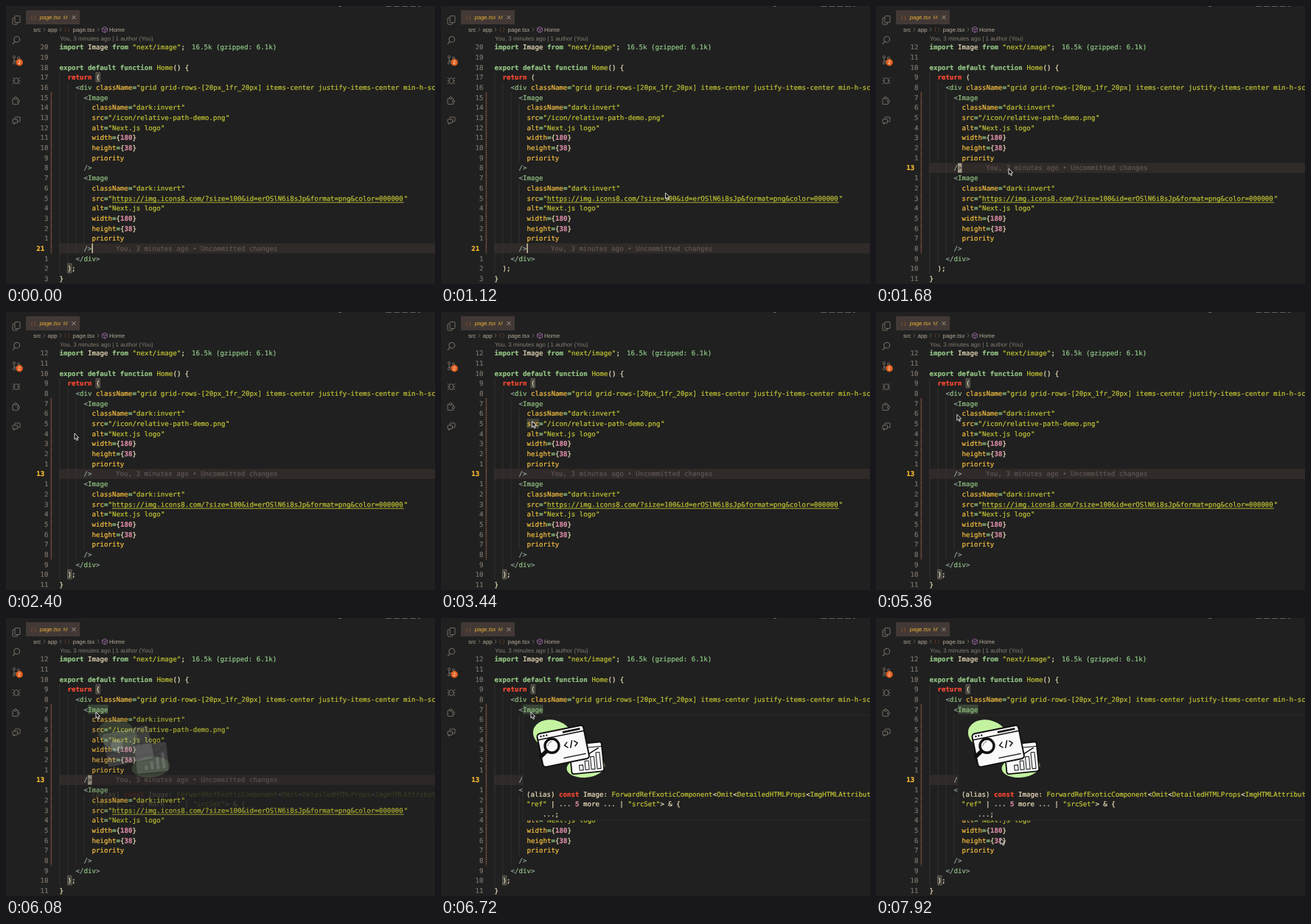
Write an HTML page with a canvas that moves like this. It is 582 px wide and 378 px high and loops after 8000 ms.

```html
<!DOCTYPE html>
<html lang="en">
<head>
<meta charset="utf-8">
<title>Editor hover preview</title>
<style>
html, body { margin: 0; width: 100%; height: 100%; overflow: hidden; background: #202020; }
canvas { display: block; width: 582px; height: 378px; }
</style>
</head>
<body>
<canvas id="stage"></canvas>
<script>
const W = 582, H = 378, LOOP = 8000;
const CW = 5.497, X0 = 72.5, ROW = 13.68, BASE = 59.3;
const CLICK = 1600, SRC_IN = 3280, SRC_OUT = 5300, IMAGE_IN = 5700, TRAVEL = 700;
const MONO = '"DejaVu Sans Mono", monospace';
const SANS = '"Liberation Sans", sans-serif';
const BG = '#202020', ICON = '#746c64', INK = '#111', PAPER = '#fafafa';

const canvas = document.getElementById('stage');
const dpr = window.devicePixelRatio || 1;
canvas.width = W * dpr;
canvas.height = H * dpr;
const c = canvas.getContext('2d');

// k keyword, f plain, s string, a attribute, t tag, p punctuation, n number, r return, u link
const COLORS = {
  k: '#92c484', f: '#ecdfba', s: '#bfc134', a: '#f2bc40', t: '#8fbf80',
  p: '#8fa396', n: '#d68aa0', r: '#fb4934', u: '#bfc134'
};
const BOLD = 'knr';

const attr = (name, value, kind = 's') => [8, 'a', name, 'k', '=', 's', '"', kind, value, 's', '"'];
const size = (name, value) => [8, 'a', name, 'k', '=', 'f', '{', 'n', value, 'f', '}'];
const imageTag = (src, kind) => [
  [6, 'p', '<', 't', 'Image'],
  attr('className', 'dark:invert'),
  attr('src', src, kind),
  attr('alt', 'Next.js logo'),
  size('width', '180'),
  size('height', '38'),
  [8, 'a', 'priority'],
  [6, 'p', '/>']
];
const LINES = [
  [0, 'k', 'import ', 'f', 'Image ', 'k', 'from ', 's', '"next/image"', 'f', ';'],
  [0],
  [0, 'k', 'export default function ', 's', 'Home', 'f', '() {'],
  [2, 'r', 'return ', 'f', '('],
  [4, 'p', '<', 't', 'div ', 'a', 'className', 'k', '=',
    's', '"grid grid-rows-[20px_1fr_20px] items-center justify-items-center min-h-screen'],
  ...imageTag('/icon/relative-path-demo.png'),
  ...imageTag('https://img.icons8.com/?size=100&id=erOSlN6i8sJp&format=png&color=000000', 'u'),
  [4, 'p', '</', 't', 'div', 'p', '>'],
  [2, 'f', ');'],
  [0, 'f', '}']
];

// arrival time and place of the pointer; each move fills the last TRAVEL ms at most
const STOPS = [
  [0, 560, -14], [1120, 304.5, 254], [CLICK, 180, 221], [2400, 93, 165],
  [3300, 123.5, 148.5], [4640, 96.5, 151.5], [IMAGE_IN, 122, 128], [7920, 169, 299.5]
];

const clamp = v => Math.max(0, Math.min(1, v));
const colX = col => X0 + col * CW;
const rowTop = row => 56 - ROW / 2 + row * ROW;

function text(str, x, y, color, font) {
  c.font = font;
  c.fillStyle = color;
  c.fillText(str, x, y);
}

// a hairline outline gives the heavier screen weight
function code(str, x, y, color, bold) {
  text(str, x, y, color, (bold ? 'bold ' : '') + '9.12px ' + MONO);
  c.strokeStyle = color;
  c.lineWidth = 0.22;
  c.strokeText(str, x, y);
}

function rect(x, y, w, h, color) {
  c.fillStyle = color;
  c.fillRect(x, y, w, h);
}

function paint(fill, stroke, width = 1) {
  if (fill) { c.fillStyle = fill; c.fill(); }
  if (stroke) { c.strokeStyle = stroke; c.lineWidth = width; c.stroke(); }
}

function line(points, color, width, fill) {
  c.beginPath();
  for (let i = 0; i < points.length; i += 2) c.lineTo(points[i], points[i + 1]);
  paint(fill, color, width);
}

function oval(x, y, rx, ry, fill, stroke, width) {
  c.beginPath();
  c.ellipse(x, y, rx, ry, 0, 0, Math.PI * 2);
  paint(fill, stroke, width);
}

function panel(x, y, w, h, r, fill, stroke, width) {
  c.beginPath();
  c.roundRect(x, y, w, h, r);
  paint(fill, stroke, width);
}

function at(x, y, angle, draw) {
  c.save();
  c.translate(x, y);
  c.rotate(angle);
  draw();
  c.restore();
}

function tokens(list, x, y) {
  for (let i = 0; i < list.length; i += 2) {
    const kind = list[i], str = list[i + 1], w = str.length * CW;
    code(str, x, y, COLORS[kind], BOLD.includes(kind));
    if (kind === 'u') rect(x, y + 2.1, w, 0.9, COLORS.u);
    x += w;
  }
}

function filesIcon() {
  panel(-5, -3, 6.5, 9, 1, null, ICON);
  panel(-2, -5.5, 7, 9, 1, BG, ICON);
}

function searchIcon() {
  oval(0.7, -1, 3.9, 3.9, null, ICON, 1.1);
  line([-2, 2, -5, 5.5], ICON, 1.2);
}

function branchIcon() {
  for (const [x, y] of [[-3, -4.5], [-3, 3.5], [3, -3]]) oval(x, y, 1.6, 1.6, null, ICON);
  line([-3, -3, -3, 2], ICON);
  line([3, -1.5, 1, 0.7, -3, 1], ICON);
  oval(4.2, 3, 4.7, 4.7, '#e2601f');
  text('2', 2.3, 5.4, '#fff', '6.5px ' + SANS);
}

function bugIcon() {
  oval(0, 0.5, 3, 4, null, ICON);
  for (const side of [-1, 1]) {
    for (const k of [-1, 0, 1]) line([side * 2.8, 0.5 + k * 2, side * 5.2, 0.5 + k * 4.5], ICON);
  }
}

function puzzleIcon() {
  panel(-5, -3, 7.5, 8, 0.5, null, ICON);
  oval(-1, -3.5, 1.6, 1.6, BG, ICON);
  oval(3, 1, 1.6, 1.6, BG, ICON);
}

function chatIcon() {
  panel(-2, -5, 7, 6, 0.5, null, ICON);
  panel(-5, -2, 6.5, 5, 0.5, BG, ICON);
  line([-3.5, 3, -3.5, 5, -1.5, 3], ICON);
}

function activityBar() {
  [filesIcon, searchIcon, branchIcon, bugIcon, puzzleIcon, chatIcon]
    .forEach((icon, i) => at(14, 19 + i * 27.4, 0, icon));
}

function cube() {
  const r = 3.9, color = '#a06aa8';
  c.beginPath();
  for (let i = 0; i < 6; i++) c.lineTo(r * Math.sin(i * Math.PI / 3), r * Math.cos(i * Math.PI / 3));
  c.closePath();
  paint(null, color, 0.9);
  for (let i = 0; i < 3; i++) {
    const a = i * Math.PI * 2 / 3;
    line([0, 0, r * Math.sin(a), r * Math.cos(a)], color, 0.8);
  }
}

function header() {
  rect(451, 0, 4, 0.8, '#777');
  c.setLineDash([8, 3]);
  line([515, 0.4, 562, 0.4], '#777', 0.8);
  c.setLineDash([]);

  rect(27, 5.7, 73, 19.3, '#423936');
  text('( )', 34, 17.5, '#a35a2a', '7px ' + SANS);
  text('page.tsx', 45.7, 18, '#e9ae36', 'italic 7.6px ' + SANS);
  text('M', 77.5, 18, '#c79a3c', 'italic 7.2px ' + SANS);
  for (const s of [-1, 1]) line([89.5, 15.5 - s * 2.5, 94.5, 15.5 + s * 2.5], '#b3a893', 0.9);

  const crumb = (str, x) => text(str, x, 34.6, '#b3a996', '7.9px ' + SANS);
  crumb('src', 37);
  crumb('app', 56.5);
  crumb('page.tsx', 90.5);
  crumb('Home', 140);
  text('( )', 79.5, 34.4, '#7d4626', '7px ' + SANS);
  for (const x of [51, 73, 124]) line([x, 29.5, x + 2, 32, x, 34.5], '#777066', 0.8);
  at(134, 32.2, 0, cube);
  text('You, 3 minutes ago | 1 author (You)', 73, 47, '#857d72', '8.1px ' + SANS);
}

function guides() {
  LINES.forEach(([indent], row) => {
    for (let col = 0; col < indent; col += 2) rect(colX(col), rowTop(row), 0.8, ROW, '#383634');
  });
}

function gutterMark() {
  const top = rowTop(5), end = rowTop(21);
  rect(60.6, top, 1.6, end - top, '#3f2e28');
  c.setLineDash([1.4, 1.4]);
  line([61.4, top, 61.4, end], '#8a5745', 1.6);
  c.setLineDash([]);
}

function box(col, row, len, fill, edge) {
  panel(colX(col), rowTop(row) + 0.2, len * CW, ROW - 1, 0, fill, edge, 0.8);
}

function editor(t) {
  const clicked = t >= CLICK;
  const current = clicked ? 12 : 20;
  rect(X0, rowTop(current), W, ROW, '#302a29');
  guides();
  gutterMark();

  if (t < 320 || t >= CLICK + 160) {
    box(9, 3, 1, '#45433e', '#6b675f');
    box(2, 22, 1, '#45433e', '#6b675f');
  }
  if (t >= SRC_IN && t < SRC_OUT) box(8, 7, 3, '#45463a');
  if (t >= IMAGE_IN) box(7, 5, 5, '#3b4638');

  LINES.forEach(([indent, ...list], row) => {
    const y = BASE + row * ROW;
    tokens(list, colX(indent), y);
    if (row === current) {
      code(row + 1, 41.2, y, '#f5b92f', true);
      code('You, 3 minutes ago • Uncommitted changes', 149, y, '#5d5652');
    } else {
      const n = String(Math.abs(row - current));
      code(n, 57.4 - n.length * CW, y, '#7c736b');
    }
  });
  code('16.5k (gzipped: 6.1k)', 252, BASE, '#8cc584');

  if ((clicked ? t - CLICK : t) % 1000 >= 500) return;
  if (clicked) {
    rect(colX(7), rowTop(12) + 0.3, CW, ROW - 0.6, '#a39a8a');
    code('>', colX(7), BASE + 12 * ROW, '#4a4540');
  } else {
    rect(colX(8), rowTop(20), 1.3, ROW - 0.5, COLORS.f);
  }
}

function chartWindow() {
  panel(-22, -19, 44, 40, 3, PAPER, INK, 1.8);
  line([-22, -13, 22, -13], INK);
  for (let i = 0; i < 4; i++) panel(-11 + i * 8, 10 - i * 5, 5, 7 + i * 5, 0, PAPER, INK);
  line([-4, 0, 9, -7, 17, -11], INK, 1.5);
}

function codeWindow() {
  panel(-32, -22, 64, 46, 4, PAPER, INK, 2);
  line([-32, -14, 32, -14], INK, 1.6);
  for (let i = 0; i < 3; i++) oval(-27 + i * 4, -18, 1.2, 1.2, INK);
  rect(3, -19, 24, 2.6, INK);
  for (const s of [-1, 1]) line([11 + s * 5, -3, 11 + s * 9, 0.5, 11 + s * 5, 4], INK, 1.5);
  line([13, -4, 9.5, 5], INK, 1.5);
  line([-2, 17, 28, 17], INK, 1.2);
}

function picture(dx, dy) {
  c.save();
  c.translate(dx, dy);
  c.lineJoin = c.lineCap = 'round';
  at(158, 55, 0.25, () => oval(0, 0, 27, 20, '#c3f3a0'));
  at(203, 99, -0.1, () => oval(0, 0, 26, 14, '#c3f3a0'));
  at(204, 85.5, -0.1, chartWindow);
  at(172, 69.5, -0.2, codeWindow);
  line([150, 77, 142, 84.5], INK, 5.5);
  oval(157, 70, 9.5, 9.5, PAPER, INK, 3.4);
  c.beginPath();
  c.arc(157, 70, 5.5, 3.2, 4.6);
  paint(null, '#777');
  c.restore();
}

function srcPopup() {
  panel(117, 27.4, 213.8, 117.8, 0, BG, '#2b2a29', 0.8);
  picture(0, 0);
  code('(property) src: string | StaticImport', 121.5, 137.3, COLORS.f);
}

function imagePopup() {
  panel(111, 132, W, 143, 0, BG, '#2f2e2d', 0.8);
  picture(-6.5, 103.8);
  tokens(['f', '(alias) ', 'r', 'const ', 'f', 'Image: ', 's', 'ForwardRefExoticComponent', 'f', '<',
    's', 'Omit', 'f', '<', 's', 'DetailedHTMLProps', 'f', '<', 's', 'ImgHTMLAttributes'], 116, 242.6);
  tokens(['s', '"ref"', 'f', ' | ... ', 'n', '5', 'f', ' more ... | ', 's', '"srcSet"', 'f', '> & {'], 116, 256.3);
  tokens(['f', '...;'], 138, 270);
}

function faded(alpha, draw) {
  if (alpha <= 0) return;
  c.globalAlpha = alpha;
  draw();
  c.globalAlpha = 1;
}

function pointer(t) {
  const next = STOPS.findIndex(stop => stop[0] > t);
  const i = next < 0 ? STOPS.length - 1 : next;
  const [t0, x0, y0] = STOPS[i - 1], [t1, x1, y1] = STOPS[i];
  const from = Math.max(t0, t1 - TRAVEL);
  const u = clamp((t - from) / (t1 - from)), e = u * u * (3 - 2 * u);
  at(x0 + (x1 - x0) * e, y0 + (y1 - y0) * e, 0, () => {
    c.lineJoin = 'round';
    line([0, 0, 0, 8.2, 1.9, 6.5, 3.2, 9.6, 4.6, 9, 3.3, 6, 5.7, 5.8, 0, 0], '#eee', 0.9, INK);
  });
}

function draw(t) {
  c.setTransform(dpr, 0, 0, dpr, 0, 0);
  c.textRendering = 'geometricPrecision';
  rect(0, 0, W, H, BG);
  activityBar();
  header();
  editor(t);
  if (t < SRC_OUT) faded(clamp((t - 3560) / 100), srcPopup);
  faded(clamp((t - 6066) / 110), imagePopup);
  pointer(t);
}

const start = performance.now();
function tick() {
  draw((performance.now() - start) % LOOP);
  requestAnimationFrame(tick);
}
tick();
</script>
</body>
</html>
```
